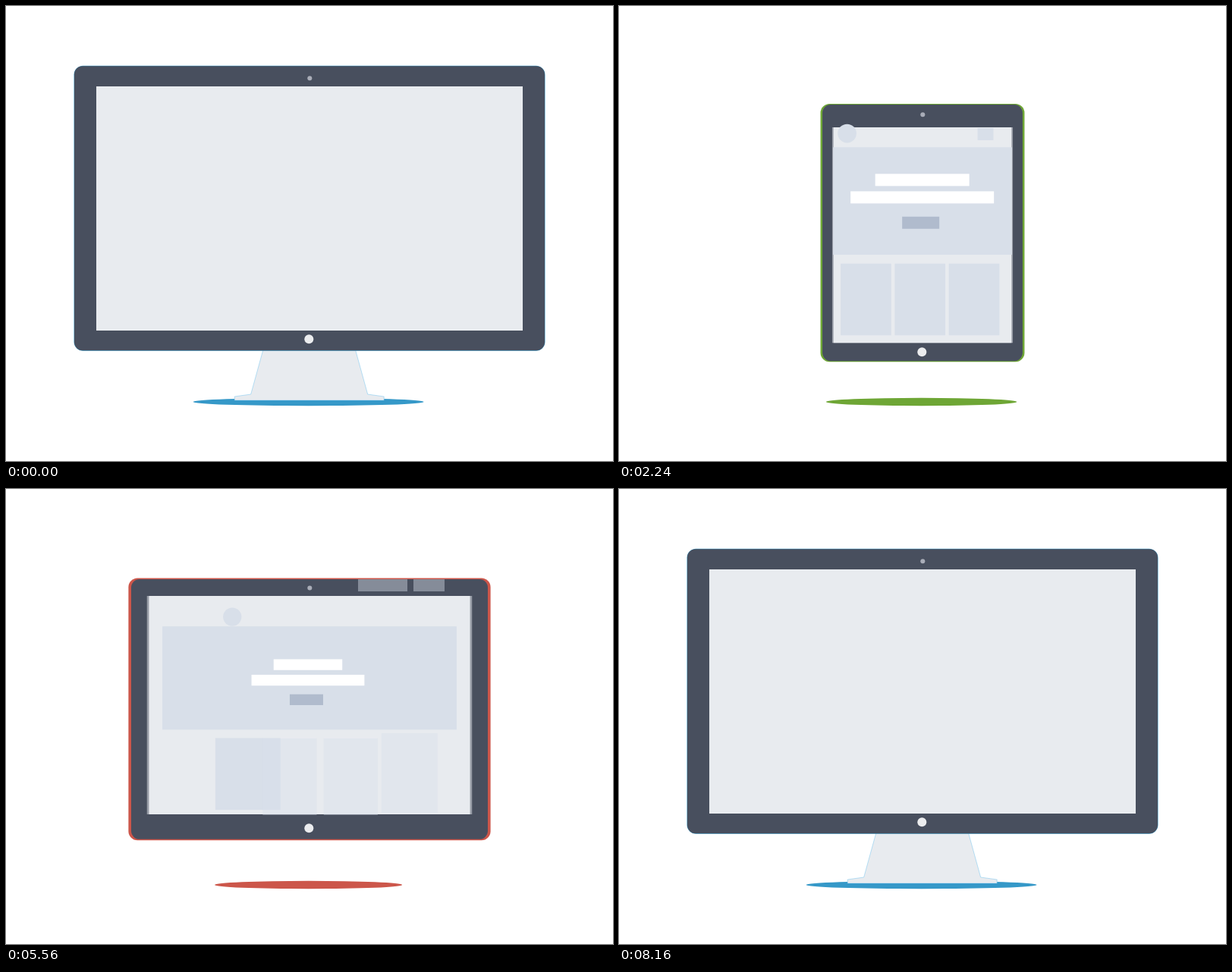
Write an HTML page with a canvas that moves like this. It is 800 by 600 pixels and loops after 8.66 s.

```html
<!DOCTYPE html>
<html lang="en">
<head>
<meta charset="utf-8">
<title>Responsive layout</title>
<style>
  html, body { margin: 0; width: 100%; height: 100%; overflow: hidden; background: #fff; }
  canvas { display: block; }
</style>
</head>
<body>
<canvas id="stage" width="800" height="600"></canvas>
<script>
const ctx = document.getElementById('stage').getContext('2d');
const LOOP = 8660, STEP = 40;
const DARK = '#484f5e', LIGHT = '#e8ebef', BLOCK = '#d8dfe9', BUTTON = '#b0bbcd';

const clamp = v => Math.min(1, Math.max(0, v));
const span = (t, a, b) => clamp((t - a) / (b - a));
const lerp = (a, b, p) => a + (b - a) * p;
const out = n => u => 1 - (1 - u) ** n;
const inOut = n => u => u < .5 ? (2 * u) ** n / 2 : 1 - (2 - 2 * u) ** n / 2;
const late = from => u => inOut(2)(span(u, from, 1));

// Draws back first, then shrinks and settles
const windUp = u => {
  const x = 2 * u, s = 2.6;
  return u < .5 ? x * x * ((s + 1) * x - s) / 2 : 1 - 4 * (1 - u) ** 3;
};

const devices = [
  { name: 'desktop', accent: [53, 152, 200], w: 620, h: 375, cy: 266.7, home: 15, shadow: 152,
    sw: 562, sh: 322, sy: 267, header: 43, hero: 159, half: 166, radius: 14, menu: [414, 41],
    text: [396.5, 204], gaps: [0, 23, 55], lines: [124, 189, 49], lineH: 16,
    cols: 4, cardX: 236, cardW: 74, pitch: 86.3, gutter: 14 },
  { name: 'tablet', accent: [110, 166, 53], w: 252, h: 337, cy: 299.5, home: 12, shadow: 123.5,
    sw: 225, sh: 283, sy: 302.7, header: 33, hero: 138, half: 99, radius: 12, menu: [484, 17],
    text: [401, 240], gaps: [0, 23, 57], lines: [124, 189, 49], lineH: 16,
    cols: 3, cardX: 297, cardW: 66, pitch: 70, gutter: 9 },
  { name: 'phone', accent: [204, 86, 74], w: 134, h: 271, cy: 311.5, home: 14, shadow: 73,
    sw: 118, sh: 212, sy: 310, header: 27, hero: 101, half: 52, radius: 10, menu: [435, 17],
    text: [400, 270], gaps: [0, 17, 34], lines: [44, 93, 37], lineH: 12,
    cols: 1, cardX: 347, cardW: 107, pitch: 0, gutter: 8 }
];

// Page parts for one device; parts it lacks keep the larger device's place
function layout(d, wider) {
  const top = d.sy - d.sh / 2, heroY = top + d.header, cardY = heroY + d.hero + d.gutter;
  const parts = [];
  const add = (ease, color, drop, shown, x, y, w, h) => {
    const box = shown ? [x, y, w, h] : wider[parts.length].box;
    parts.push({ ease, color, drop, shown, box });
  };
  add('hero', BLOCK, 0, 1, 400 - d.sw / 2, heroY, d.sw, d.hero);
  add('avatar', BLOCK, -22, 1, 400 - d.half, heroY - d.header / 2 - d.radius, 2 * d.radius, 2 * d.radius);
  const [menuX, menuW] = d.menu, menuY = heroY - d.header / 2 - 8.5;
  add('menu', BLOCK, -27, 1, menuX, menuY, menuW, 16);
  add('link', BLOCK, -27, +(d.cols > 3), 464, menuY, 65, 16);
  add('link', BLOCK, -27, +(d.cols > 3), 537, menuY, 41, 16);
  d.lines.forEach((w, i) => add('text', i < 2 ? '#fff' : BUTTON, 14, 1,
    d.text[0] - w / 2 - (i === 2 ? 2 : 0), d.text[1] + d.gaps[i] - d.lineH / 2, w, d.lineH));
  for (let i = 0; i < 4; i++)
    add('card', BLOCK, 80, +(i < d.cols), d.cardX + i * d.pitch, cardY,
      d.cardW, Math.min(d.cardW * 1.42, top + d.sh - cardY));
  return parts;
}
const pages = [];
for (const d of devices) pages.push(layout(d, pages.at(-1)));

const moves = [
  { start: 1600, end: 2400, from: 0, to: 1, size: windUp, cy: out(2.87), sy: out(2.6),
    hero: inOut(1.15), avatar: inOut(1.05), card: inOut(2), text: late(.48), menu: late(.3) },
  { start: 3720, end: 4440, from: 1, to: 2 },
  { start: 5320, end: 6000, from: 2, to: 0, size: out(2.7), cy: out(1.46), sy: out(2),
    hero: out(2.15), avatar: out(1.8), card: out(2.35), text: out(2), menu: out(2) }
];

function disc(x, y, rx, ry = rx) {
  ctx.beginPath();
  ctx.ellipse(x, y, rx, ry, 0, 0, 7);
  ctx.fill();
}

function panel(w, h, cy, r, color, alpha = 1) {
  ctx.globalAlpha = alpha;
  ctx.fillStyle = color;
  ctx.beginPath();
  ctx.roundRect(400 - w / 2, cy - h / 2, w, h, r);
  ctx.fill();
  ctx.globalAlpha = 1;
}

function stand(shown) {
  if (shown <= 0) return;
  ctx.save();
  ctx.translate(399.7, -75 * (1 - shown));
  ctx.beginPath();
  const side = [[61, 450], [61, 454], [77, 512], [98.5, 515], [98.5, 520]];
  side.forEach(([x, y]) => ctx.lineTo(x, y));
  side.reverse().forEach(([x, y]) => ctx.lineTo(-x, y));
  ctx.closePath();
  ctx.fillStyle = LIGHT;
  ctx.fill();
  ctx.strokeStyle = 'rgba(90,185,235,.6)';
  ctx.lineWidth = .7;
  ctx.stroke();
  ctx.restore();
}

// Ring of five white dots, outlined below the device
function puff(x, y, t, bottom) {
  const p = span(t, 1840, 2080);
  if (p <= 0 || p >= 1) return;
  for (let i = 0; i < 5; i++) {
    const a = -Math.PI / 2 + i * Math.PI * 2 / 5, r = 4 + 12 * p;
    const dx = x + r * Math.cos(a), dy = y + r * .8 * Math.sin(a);
    ctx.fillStyle = '#fff';
    disc(dx, dy, 6.6 * (1 - p));
    if (dy > bottom) {
      ctx.strokeStyle = '#7fc4e6';
      ctx.lineWidth = 1;
      ctx.stroke();
    }
  }
}

function opacity(a, b, u, backHome) {
  if (a.ease === 'menu' && backHome) return Math.max(0, 1 - 5 * u, 2.5 * u - 1.5);
  if (a.shown === b.shown) return a.shown;
  if (b.shown) return clamp(1.2 * u);
  return 1 - (a.ease === 'link' ? span(u, .1, .75) : span(u, .45, .8));
}

function draw(t) {
  const move = moves.findLast(m => t >= m.start) ?? { start: 0, end: 0, from: 0, to: 0 };
  const { from, to } = move;
  const u = from === to ? 0 : span(t, move.start, move.end);
  const eased = name => (move[name] ?? inOut(3))(u);
  const A = devices[from], B = devices[to];
  const mix = (key, name) => lerp(A[key], B[key], eased(name));
  const moving = Math.sin(Math.PI * u);
  const tint = span(u, .5, .8);
  const accent = `rgb(${A.accent.map((c, i) => Math.round(lerp(c, B.accent[i], tint)))})`;

  ctx.globalAlpha = 1;
  ctx.fillStyle = '#fff';
  ctx.fillRect(0, 0, 800, 600);
  ctx.fillStyle = accent;
  disc(398.6, 522, mix('shadow', 'card'), 5.2);

  if (from === 0) stand(to === 0 ? 1 : 1 - span(u, 0, .35) ** 2);
  else if (to === 0) stand(out(2)(span(u, .5, 1)));

  const w = mix('w', 'size'), h = mix('h', 'size'), cy = mix('cy', 'cy');
  const sw = mix('sw', 'size'), sh = mix('sh', 'size'), sy = mix('sy', 'sy');
  const bottom = cy + h / 2;
  panel(w + 1 + 7 * moving, h + 1 + 2 * moving, cy, 12, accent);
  panel(w, h, cy, 11, DARK);
  panel(sw + 4 * moving, sh, sy, 0, LIGHT, .5);
  panel(sw - 2 * moving, sh, sy, 0, LIGHT);

  ctx.fillStyle = '#a9adb8';
  disc(400.3, cy - h / 2 + 16 - 5 * moving, 3);
  ctx.fillStyle = '#ebecee';
  disc(399.3, bottom - mix('home', 'size'), 6);

  const entry = t < 4000 ? span(t, 80, 920) : 1 - span(t, 7200, 8040);
  pages[from].forEach((a, i) => {
    const b = pages[to][i], p = eased(a.ease === 'link' ? 'menu' : a.ease);
    let [x, y, bw, bh] = a.box.map((v, k) => lerp(v, b.box[k], p));
    const e = out(3)(span(entry, i * .04, i * .04 + .5));
    y += a.drop * (1 - e);
    ctx.globalAlpha = opacity(a, b, u, from === 2) * e;
    ctx.fillStyle = a.color;
    if (a.ease === 'hero') {
      bw = Math.min(bw, sw);
      x = 400 - bw / 2;
    }
    if (a.ease === 'avatar') disc(x + bw / 2, y + bh / 2, bw / 2);
    else ctx.fillRect(x, y, bw, bh);
  });

  ctx.globalAlpha = 1;
  puff(533.5, 142.5, t, 600);
  puff(220, 472, t, bottom);
}

let begin;
function tick(now) {
  begin ??= now;
  const t = (now - begin) % LOOP;
  draw(Math.floor(t / STEP) * STEP);
  requestAnimationFrame(tick);
}
requestAnimationFrame(tick);
</script>
</body>
</html>
```
